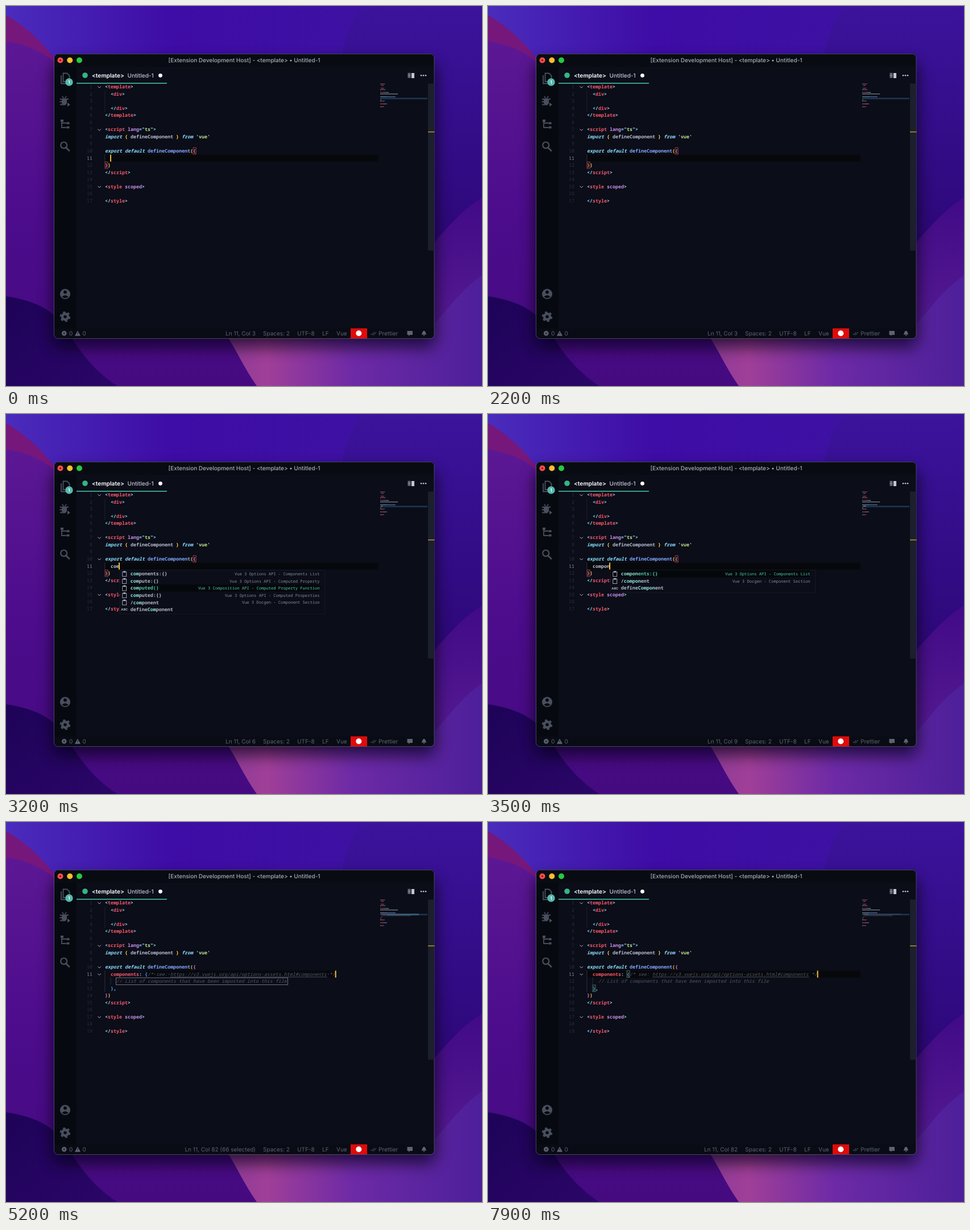
Recreate the animation shown at these times as an HTML page. Size 837 px wide and 669 px high, loop 8000 ms.

```html
<!DOCTYPE html>
<html lang="en">
<head>
<meta charset="utf-8">
<title>Editor autocomplete</title>
<style>
  html, body { margin: 0; width: 100%; height: 100%; overflow: hidden; background: #3a0c8c; }
  svg { display: block; width: 837px; height: 669px; }
  text { white-space: pre; text-rendering: geometricPrecision; }
  .ui text { font: 10px Inter, sans-serif; fill: #5d6373; }
  .ui .title { font-weight: 500; fill: #a9aeba; }
  .ui .tab { font-weight: 500; fill: #c3c7d0; }
  .ui .name { font: 600 10.2px Inter, sans-serif; fill: #fff; }
  .code text { font: 600 8.345px "Noto Sans Mono", monospace; }
  .code .num { font-weight: 400; fill: #2b2f40; }
  .code .now { fill: #8a90a3; }
  .code .detail { font-weight: 400; font-size: 7.13px; fill: #868c9b; }
  .code .abc { font: 700 5.5px Inter, sans-serif; fill: #b0b5c3; }
  .item { fill: #b4bac9; }
  .hit { fill: #8fe0d6; font-weight: 700; }
  .code .pick { fill: #4fc9ad; }
  .code .focus { fill: #fff; }
  .p { fill: #89ddff; } .t { fill: #f8586a; } .a { fill: #c792ea; }
  .k { fill: #89ddff; font-style: italic; } .v { fill: #b9c0d2; }
  .f { fill: #82aaff; } .s { fill: #c3e88d; }
  .g { fill: #ffd23c; } .o { fill: #da70d6; } .b { fill: #3ba5f5; }
  .c, .u { fill: #525866; font-style: italic; }
  .code .c, .code .u { font-weight: 400; }
</style>
</head>
<body>
<svg viewBox="0 0 837 669" xmlns="http://www.w3.org/2000/svg">
  <defs>
    <linearGradient id="sky" x2="1">
      <stop stop-color="#4a2cbc"/><stop offset=".35" stop-color="#3e0ca6"/>
      <stop offset="1" stop-color="#3d14a0"/>
    </linearGradient>
    <linearGradient id="side" x2="0" y2="1">
      <stop stop-color="#5c1894"/><stop offset=".5" stop-color="#4c0c8c"/>
      <stop offset="1" stop-color="#450a80"/>
    </linearGradient>
    <linearGradient id="east" x2="0" y2="1">
      <stop stop-color="#3b139c"/><stop offset="1" stop-color="#2c0776"/>
    </linearGradient>
    <linearGradient id="low" x2="0" y2="1">
      <stop stop-color="#410a86"/><stop offset="1" stop-color="#5d2198"/>
    </linearGradient>
    <linearGradient id="rose" x2="1">
      <stop stop-color="#8c3a96"/><stop offset=".16" stop-color="#a03f98"/>
      <stop offset=".5" stop-color="#6d2aa6"/><stop offset="1" stop-color="#4d1f9a"/>
    </linearGradient>
    <linearGradient id="dark" x2="1" y2="1">
      <stop stop-color="#1d0358"/><stop offset="1" stop-color="#2b0668"/>
    </linearGradient>
    <filter id="soft" x="-20%" y="-20%" width="140%" height="150%"><feGaussianBlur stdDeviation="14"/></filter>
    <clipPath id="frame"><rect x="85" y="84" width="668" height="501" rx="7"/></clipPath>
  </defs>

  <path fill="url(#sky)" d="M0 0H837V669H0z"/>
  <path fill="url(#east)" d="M627 0C606 28 596 56 590 90V440H837V0z"/>
  <path fill="#76177c" d="M0 16C28 32 58 56 90 98V120H0z"/>
  <path fill="url(#side)" d="M0 62C35 68 62 78 90 102L400 580 450 669H0z"/>
  <path fill="url(#low)" d="M837 337C800 360 772 395 745 425V669H837z"/>
  <path fill="url(#rose)" d="M385 575C405 605 420 640 441 669H837V474C800 500 775 535 745 570z"/>
  <path fill="url(#dark)" d="M0 511C45 518 75 530 100 560 125 600 150 640 196 669H0z"/>
  <rect x="83" y="100" width="672" height="500" rx="12" fill="#04000f" opacity=".7" filter="url(#soft)"/>

  <g clip-path="url(#frame)">
    <path fill="#0b0d18" d="M85 84h668v501H85z"/>
    <path fill="#080c12" d="M85 84h668v23H85z"/>
    <path fill="#060a10" d="M85 107h39v461H85z"/>
    <path fill="#090c14" d="M85 568h668v17H85z"/>
    <path fill="#e00b0b" d="M606 567.500h29v18h-29z"/>
    <path fill="#45cfae" d="M124 135.300h159v1.500H124z"/>
  </g>
  <rect x="84.500" y="84.500" width="668.500" height="501" rx="7" fill="none" stroke="#858698" stroke-opacity=".5" stroke-width=".9"/>

  <g class="ui">
    <circle cx="95.500" cy="95.500" r="5" fill="#ff4f4b"/><circle cx="95.500" cy="95.500" r="1.600" fill="#7d0d0d"/>
    <circle cx="112.300" cy="95.500" r="5" fill="#ffbd2e"/><circle cx="129" cy="95.500" r="5" fill="#28c940"/>
    <text class="title" x="419" y="99" text-anchor="middle">[Extension Development Host] - &lt;template> • Untitled-1</text>
    <circle cx="139" cy="122" r="4.800" fill="#35b482"/>
    <text class="name" x="151" y="125.600">&lt;template></text>
    <text class="tab" x="213.500" y="125.600">Untitled-1</text>
    <circle cx="271.500" cy="122.300" r="3.400" fill="#fff"/>

    <g stroke="#c2c6cf" stroke-width="1.100" fill="#c2c6cf">
      <path d="M706.500 118.800h5M706.500 121.100h5M706.500 123.400h5M706.500 125.700h5"/>
      <path d="M713.500 118.500h4v8h-4z"/>
    </g>
    <g fill="#c2c6cf"><circle cx="730" cy="122.300" r="1.300"/><circle cx="734" cy="122.300" r="1.300"/><circle cx="738" cy="122.300" r="1.300"/></g>

    <g fill="none" stroke="#4a4f5e" stroke-width="1.800">
      <path d="M100.500 118.500h7l4 4v10.500h-11zM97 122v14.500h10"/>
      <ellipse cx="102.500" cy="168.500" rx="3.800" ry="5.300" fill="#4a4f5e"/>
      <path d="M95 164h15M94.500 168.500h9M95 173.500h6M99 159l2 3M106 159l-2 3"/>
      <path d="M108 170l5 3.500-5 3.500z" fill="#4a4f5e" stroke="none"/>
      <path d="M98 203v11h8M98 206h8"/>
      <path d="M96 200h5v4h-5zM106.500 204.500h5v3.500h-5zM106.500 212h5v3.500h-5z" fill="#4a4f5e" stroke="none"/>
      <circle cx="101.700" cy="245" r="5.500" stroke-width="2.200"/><path d="M105.800 249.500l6 6" stroke-width="2.600"/>
    </g>
    <circle cx="111" cy="134" r="6.700" fill="#55b8ad"/>
    <text x="111" y="137" text-anchor="middle" style="font-size:8px;font-weight:600;fill:#fff">1</text>
    <circle cx="104" cy="507" r="9" fill="#4a4f5e"/><circle cx="104" cy="503.700" r="2.900" fill="#060a10"/>
    <path d="M98.300 511.800q5.700-5 11.400 0-5.700 5-11.400 0z" fill="#060a10"/>
    <circle cx="104" cy="547" r="5" fill="none" stroke="#4a4f5e" stroke-width="4.400"/>
    <circle cx="104" cy="547" r="8" fill="none" stroke="#4a4f5e" stroke-width="2.600" stroke-dasharray="4.100 4.277"/>

    <g fill="#5d6373">
      <circle cx="102.300" cy="576.300" r="4.300"/>
      <path d="M126 571.500l5 9.300h-10z"/>
      <path d="M705.500 572h9.500v7h-5l-2 2.200V579h-2.500z"/>
      <path d="M730.500 578.500c2-1.500 1-6.500 4.500-6.500s2.500 5 4.500 6.500zM733.700 579.300h2.600v1.300h-2.600z"/>
    </g>
    <path d="M100.600 574.600l3.400 3.400m0-3.400l-3.400 3.400M126 574.500v3.300" stroke="#090c14"/>
    <path d="M641.500 577l2 2 4-5M645.500 578.500l1 .7 4.500-5.200" stroke="#5d6373" fill="none"/>
    <circle cx="620.300" cy="576.300" r="5" fill="#fff"/>
    <text x="111" y="580">0</text><text x="134.500" y="580">0</text>
    <text id="pos" x="439" y="580" text-anchor="end"></text>
    <text x="452" y="580">Spaces: 2</text><text x="512" y="580">UTF-8</text>
    <text x="556" y="580">LF</text><text x="581" y="580">Vue</text><text x="655" y="580">Prettier</text>
  </g>

  <g class="code" id="code"></g>
  <path id="caret" fill="#ffc53d"/>
</svg>

<script>
const LOOP = 8000, CH = 5.007, ROW = 12.55, LEFT = 174;
const $ = id => document.getElementById(id);
const esc = s => s.replace(/&/g, '&amp;').replace(/</g, '&lt;');
const rowY = n => 142 + ROW * (n - 1);
const colX = c => LEFT + CH * (c - 1);
const rect = (x, y, w, h, fill, extra = '') =>
  `<rect x="${x}" y="${y}" width="${w}" height="${h}" fill="${fill}" ${extra}/>`;
const frame = (x, y, w, h, color) => rect(x, y, w, h, 'none', `stroke="${color}" stroke-width=".9"`);
const span = ([cls, s]) => `<tspan class="${cls}">${esc(s)}</tspan>`;
const text = (x, y, body, attrs = '') => `<text x="${x}" y="${y + 3}" ${attrs}>${body}</text>`;

// [start, typed text, mode]
const steps = [
  [0, ''], [2600, 'c'], [2700, 'c', 'list'], [2950, 'co', 'list'], [3100, 'com', 'list'],
  [3300, 'comp', 'list'], [3400, 'compo', 'list'], [3500, 'compon', 'list'],
  [5000, '', 'select'], [7800, '', 'done']
];
const blinks = [0, 100, 600, 1100, 1600, 2200, 2600, 3850, 4300, 4800, 5000, 5600, 6100, 6600, 7100, 7600, 7800];

const options = 'Vue 3 Options API - ', compose = 'Vue 3 Composition API - ';
const items = [
  ['components:{}', options + 'Components List'],
  ['compute:{}', options + 'Computed Property'],
  ['computed()', compose + 'Computed Property Function'],
  ['computed:{}', options + 'Computed Properties'],
  ['const', 'TSdoc Variable Section'],
  ['const inject =', compose + 'Inject Function'],
  ['const key =', compose + 'InjectionKey Function'],
  ['ctor', 'Constr…'],
  ['/component', 'Vue 3 Docgen - Component Section'],
  ['defineComponent', ''],
  ['onErrorCaptured()', compose + 'onErrorCaptured Function'],
  ['typescript class', 'Typescript Class']
];

const open = name => [['p', '<'], ['t', name], ['p', '>']];
const close = name => [['p', '</'], ['t', name], ['p', '>']];
const pad = n => ['v', ' '.repeat(n)];

function source(typed, filled) {
  const body = filled ? [
    [pad(2), ['t', 'components'], ['p', ':'], ['v', ' '], ['b', '{'], ['c', '/* see: '],
      ['u', 'https://v3.vuejs.org/api/options-assets.html#components'], ['c', ' */']],
    [pad(4), ['c', '// List of components that have been imported into this file']],
    [pad(2), ['b', '}'], ['p', ',']]
  ] : [[pad(2), ['v', typed]]];
  return [
    open('template'), [pad(2), ...open('div')], [], [pad(2), ...close('div')], close('template'), [],
    [['p', '<'], ['t', 'script'], ['a', ' lang'], ['p', '="'], ['s', 'ts'], ['p', '">']],
    [['k', 'import '], ['g', '{'], ['v', ' defineComponent '], ['g', '}'], ['k', ' from '],
      ['p', "'"], ['s', 'vue'], ['p', "'"]],
    [],
    [['k', 'export default '], ['f', 'defineComponent'], ['g', '('], ['o', '{']],
    ...body,
    [['o', '}'], ['g', ')']], close('script'), [],
    [['p', '<'], ['t', 'style'], ['a', ' scoped'], ['p', '>']], [], close('style')
  ];
}

function minimap(lines, mode) {
  let out = rect(658, 161.6, 83, 2.6, '#193750');
  if (mode === 'select') out += rect(670, 161.6, 56, 2.6, '#2f6288');
  lines.forEach((line, i) => {
    let x = 658;
    for (const [cls, s] of line) {
      const w = s.length * .84;
      if (s.trim()) out += `<rect class="${cls}" x="${x}" y="${136.6 + i * 2.51}" width="${w}" height="1.3" opacity=".6"/>`;
      x += w;
    }
  });
  return out;
}

function label(s, query) {
  let at = s.search(new RegExp('\\b' + query));
  if (at < 0) at = s.toLowerCase().indexOf(query);
  const end = at + query.length;
  return esc(s.slice(0, at)) + span(['hit', s.slice(at, end)]) + esc(s.slice(end));
}

function popup(query, x) {
  const first = query === 'c';
  const rows = items.filter(([s]) => first || (s.toLowerCase().includes(query) && s !== 'onErrorCaptured()'));
  const picked = query.length > 4 ? 'components:{}' : 'computed()';
  const top = first ? 282.7 : 281.3;
  const bottom = first ? 428 : top + rows.length * ROW - 4.5;
  let out = rect(x + 1.5, 275, 360, bottom - 275, '#0b0d18', 'stroke="#191c28" stroke-width=".8"');
  if (first) out += rect(x + 353, 296, 8.5, 132, '#1a1e2a') + rect(x + 5.5, 275.5, 7, 1.3, '#b0b5c3');
  rows.forEach(([s, detail], i) => {
    const y = top + i * ROW, focus = s === 'ctor', on = s === picked || focus;
    const tone = focus ? 'focus' : on ? 'pick' : '';
    if (on) out += rect(x + 2, y - 6.2, 350, 12.4, '#05080b');
    out += s === 'defineComponent' ? text(x + 3.3, y - .6, 'ABC', 'class="abc"')
      : frame(x + 5.7, y - 3.3, 7, 8, '#b0b5c3') + rect(x + 7.3, y - 4.8, 3.8, 2.6, '#b0b5c3');
    out += text(x + 19.7, y, label(s, query), `class="item ${tone}"`);
    out += text(x + (focus ? 336 : 352.5), y - .3, detail, `class="detail ${tone}" text-anchor="end"`);
    if (focus) out += `<circle cx="${x + 346}" cy="${y + 1}" r="4.5" fill="#c8ccd5"/>` + rect(x + 345.5, y, 1, 3.5, '#0b0d18') + rect(x + 345.5, y - 1.8, 1, 1.1, '#0b0d18');
  });
  return out;
}

function draw([, typed, mode]) {
  const filled = mode === 'select' || mode === 'done';
  const lines = source(typed, filled);
  const col = filled ? 82 : 3 + typed.length, x = colX(col);
  const y = rowY(11);
  let out = '';

  if (mode === 'select') out += rect(colX(16), y - 6, 66 * CH, 12, '#07090f');
  else out += rect(LEFT, y - 5.8, 481, 12, '#07080b');

  out += rect(173.6, 149, .7, 37.5, '#2a2e3b') + rect(173.6, y - 6, .7, filled ? 37.5 : 12.5, '#3b3f4c');
  if (filled) out += rect(183.7, y + 6, .7, 12.5, '#3b3f4c');

  const pairs = mode === 'select' ? [] : filled ? [[15, 11], [3, 13]] : [[32, 10], [1, 12]];
  for (const [c, n] of pairs) out += frame(colX(c), rowY(n) - 5.6, 5, 11.6, filled ? '#5d8067' : '#a5463c');

  const folds = filled ? [1, 7, 10, 11, 17] : typed.length > 1 ? [1, 7, 10, 15] : [1, 7, 15];
  lines.forEach((line, i) => {
    const n = i + 1, ly = rowY(n);
    out += text(152, ly, n, `class="num ${n === 11 ? 'now' : ''}" text-anchor="end"`);
    if (line.length) out += text(LEFT, ly, line.map(span).join(''));
    if (folds.includes(n)) out += `<path d="M161.500 ${ly - .6}l2.700 2.700 2.700-2.700" fill="none" stroke="#b5bac6"/>`;
  });

  if (filled) out += rect(colX(24), y + 5, 55 * CH, .8, '#5a606c');
  if (mode === 'select') {
    out += frame(193.5, rowY(12) - 5.8, 302, 12.2, '#777c86');
    for (const c of [18, 23, 79]) out += `<circle cx="${colX(c) + 2.5}" cy="${y + .5}" r=".7" fill="#5a606c"/>`;
  }

  out += minimap(lines, mode);
  out += rect(742, 136.5, 11, filled ? 282 : 294, '#1c202d');
  out += rect(742, filled ? 217.4 : 220.9, 11.5, 1.5, '#b89a27');
  if (mode === 'list') out += popup(typed, x);

  $('code').innerHTML = out;
  $('pos').textContent = `Ln 11, Col ${col}` + (mode === 'select' ? ' (66 selected)' : '');
  $('caret').setAttribute('d', `M${x - .9} ${y - 5.8}h1.900v12.200h-1.900z`);
}

let shown;
function tick() {
  const t = performance.now() % LOOP;
  const step = steps.filter(s => s[0] <= t).pop();
  if (step !== shown) draw(shown = step);
  $('caret').style.opacity = blinks.filter(b => b <= t).length % 2;
  requestAnimationFrame(tick);
}
tick();
</script>
</body>
</html>
```
